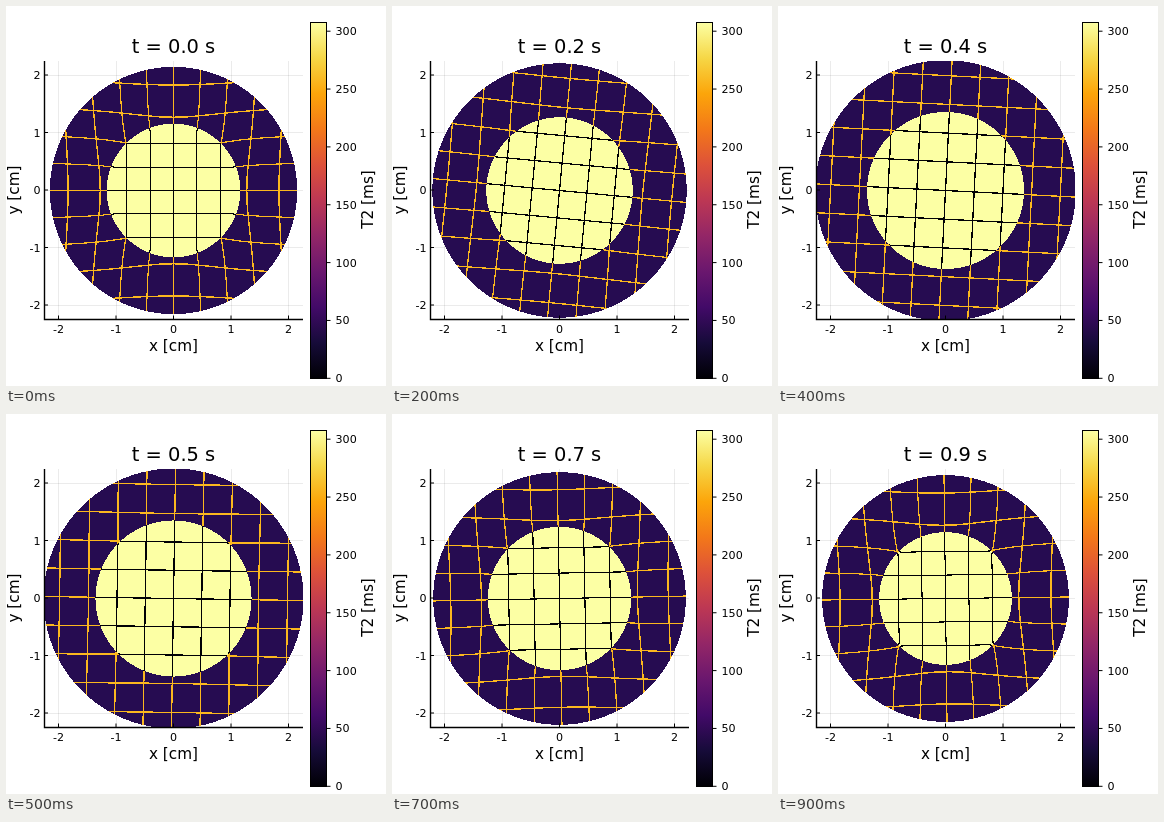
These frames come from a looping animation (380 by 380 pixels, 1 s). An HTML page with a canvas:

```html
<!DOCTYPE html>
<html lang="en">
<head>
<meta charset="utf-8">
<title>T2 map of a beating phantom</title>
<style>
  html, body { margin: 0; width: 100%; height: 100%; overflow: hidden; background: #fff; }
  canvas { position: absolute; left: 38px; top: 55px; }
  svg { position: absolute; left: 0; top: 0; }
  text { font-family: "DejaVu Sans", sans-serif; font-size: 11.11px; text-anchor: middle; }
  .guide { font-size: 15.28px; }
  .title { font-size: 19.44px; }
  .left { text-anchor: start; }
  .right { text-anchor: end; }
  path { stroke: #000; fill: none; }
</style>
</head>
<body>
<canvas id="map" width="259" height="259"></canvas>
<svg id="plot" width="380" height="380" viewBox="0 0 380 380">
  <defs><linearGradient id="inferno" x1="0" y1="1" x2="0" y2="0"></linearGradient></defs>
  <rect x="304.5" y="16.5" width="16" height="356" fill="url(#inferno)" stroke="#000"/>
  <path d="M38.5 55V313.5H297" stroke-width="1.4"/>
  <text id="title" class="title" x="167.5" y="47"></text>
  <text class="guide" x="167.5" y="345">x [cm]</text>
  <text class="guide" transform="translate(12.5 184) rotate(-90)">y [cm]</text>
  <text class="guide" transform="translate(366.8 193.5) rotate(-90)">T2 [ms]</text>
</svg>
<script>
const LOOP = 1000, STEPS = 10;
const CM = 57.5, CX = 167.5, CY = 184;
const SPACING = 28.7, TAG = 0.65;
const REST_INNER = 78.5, RING = 10820, SQUEEZE = 2050;
const TWIST = [0, 3.4, 5.4, 4.7, 2.9, 0.9, -0.6, -1.1, -1.1, -0.7];
const INFERNO = ['#000004', '#160b39', '#420a68', '#6a176e', '#932667', '#bc3754',
  '#dd513a', '#f37819', '#fca50a', '#f6d746', '#fcffa4'];
const BLOOD = [252, 255, 164], MUSCLE = [38, 12, 81], MUSCLE_TAG = [251, 184, 30], BLOOD_TAG = [0, 0, 4];

const plot = document.getElementById('plot');
const title = document.getElementById('title');
const canvas = document.getElementById('map');
const ctx = canvas.getContext('2d');
const { width, height } = canvas;

function add(parent, tag, attrs, text = '') {
  const el = document.createElementNS('http://www.w3.org/2000/svg', tag);
  for (const key in attrs) el.setAttribute(key, attrs[key]);
  el.textContent = text;
  parent.appendChild(el);
}

function buildAxes() {
  INFERNO.forEach((color, i) =>
    add(document.getElementById('inferno'), 'stop', { offset: i / 10, 'stop-color': color }));
  for (let v = -2; v <= 2; v++) {
    const x = CX + v * CM, y = CY - v * CM;
    add(plot, 'path', { d: `M${x} 313V309.5M38 ${y}H42` });
    add(plot, 'text', { x, y: 327 }, v);
    add(plot, 'text', { x: 34.5, y: y + 4, class: 'right' }, v);
  }
  for (let v = 0; v <= 300; v += 50) {
    const y = 372.3 - v * 1.157;
    add(plot, 'path', { d: `M320.5 ${y}H324.5` });
    add(plot, 'text', { x: 329.5, y: y + 4, class: 'left' }, v);
  }
}

const onTag = u => Math.abs(u - SPACING * Math.round(u / SPACING)) < TAG;

// Loss of squared radius in the tagged tissue: quick filling, then a smooth squeeze.
function squeeze(t) {
  return SQUEEZE * (t < 0.4 ? (1 - t / 0.4) ** 2 : Math.sin(Math.PI * (t - 0.4)) ** 2);
}

// Blood scales evenly; the muscle ring keeps its area.
function drawMap(step) {
  const t = step / STEPS;
  const inner = 72.4 + 6.2 * Math.cos(2 * Math.PI * (t - 0.43));
  const outer = Math.sqrt(inner ** 2 + RING);
  const shift = squeeze(t);
  const lumen = Math.sqrt(REST_INNER ** 2 - shift);
  const angle = TWIST[step] * Math.PI / 180;
  const cos = Math.cos(angle), sin = Math.sin(angle);
  const image = ctx.createImageData(width, height);

  for (let j = 0; j < height; j++) {
    const y = j + 0.5 - height / 2;
    for (let i = 0; i < width; i++) {
      const x = i + 0.5 - width / 2, r = Math.hypot(x, y);
      if (r > outer) continue;
      const blood = r < inner;
      const scale = r < lumen ? REST_INNER / lumen : Math.sqrt(r * r + shift) / r;
      const tagged = onTag((cos * x + sin * y) * scale) || onTag((cos * y - sin * x) * scale);
      const color = blood ? (tagged ? BLOOD_TAG : BLOOD) : (tagged ? MUSCLE_TAG : MUSCLE);
      image.data.set([...color, 255], 4 * (j * width + i));
    }
  }
  ctx.putImageData(image, 0, 0);

  // Faint grid behind the disc.
  ctx.globalCompositeOperation = 'destination-over';
  ctx.fillStyle = 'rgba(0, 0, 0, 0.08)';
  for (let v = -2; v <= 2; v++) {
    ctx.fillRect(Math.floor(CX + v * CM - 38), 0, 1, height);
    ctx.fillRect(0, Math.floor(CY - v * CM - 55), width, 1);
  }
  ctx.globalCompositeOperation = 'source-over';
}

let shown = -1;
function render(ms) {
  const step = Math.floor((ms % LOOP) / LOOP * STEPS);
  if (step === shown) return;
  shown = step;
  drawMap(step);
  title.textContent = `t = 0.${step} s`;
}

buildAxes();
render(0);
const start = performance.now();
function tick() {
  render(performance.now() - start);
  requestAnimationFrame(tick);
}
requestAnimationFrame(tick);
</script>
</body>
</html>
```
